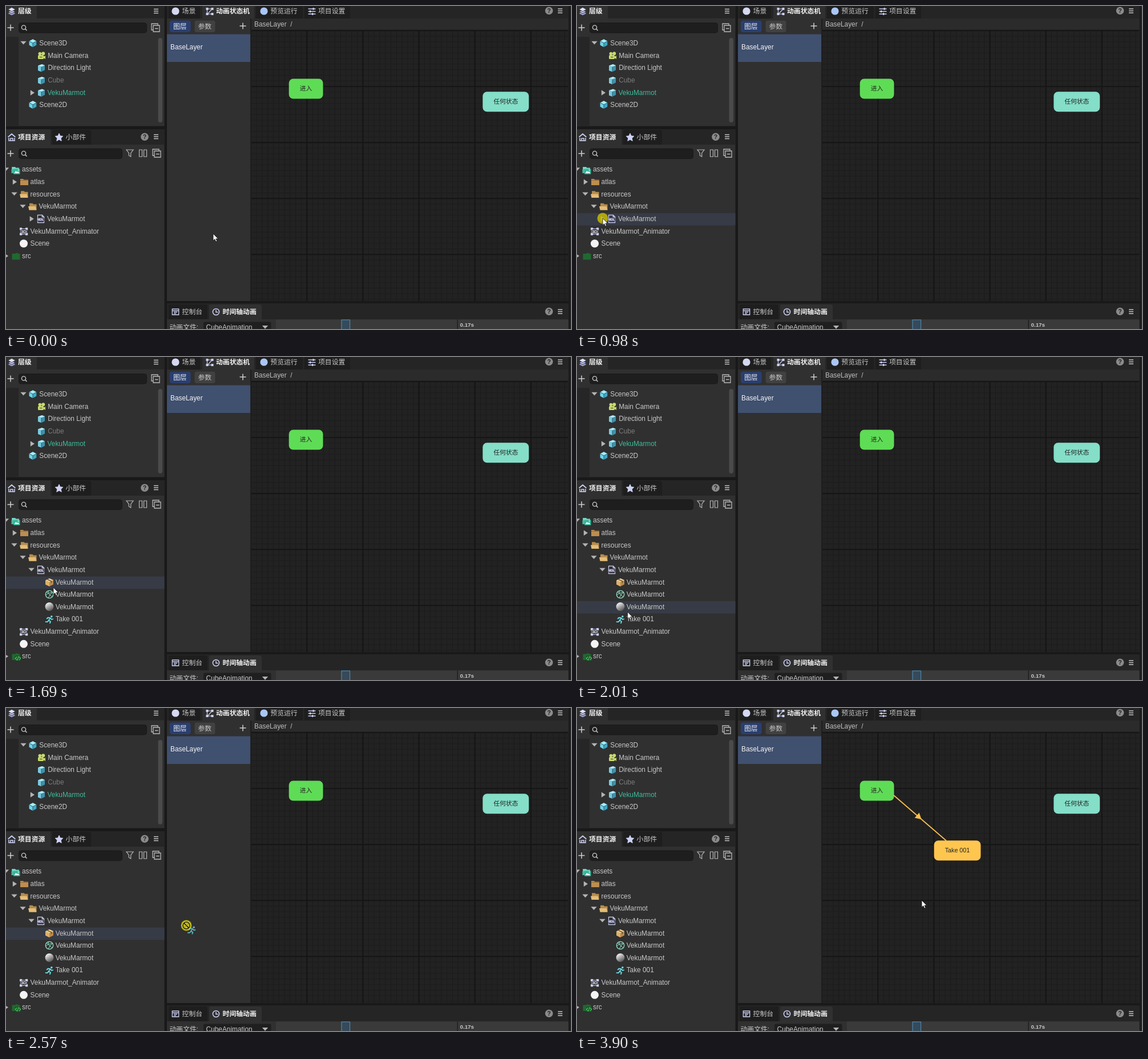
Recreate the animation shown at these times as an HTML page. Size 990 by 566 pixels, loop 4.38 s.

```html
<!DOCTYPE html>
<html lang="zh-CN">
<head>
<meta charset="utf-8">
<title>Editor</title>
<style>
html, body { margin: 0; width: 100%; height: 100%; overflow: hidden; background: #191919; }
svg { display: block; }
text { font-family: "Liberation Sans", Arial, "Noto Sans CJK SC", "Noto Sans CJK", sans-serif; white-space: pre; }
</style>
</head>
<body>
<svg id="stage" width="990" height="566" viewBox="0 0 990 566"></svg>
<script>
const LOOP = 4380, ROW = 21.64, TREE_TOP = 276.4;
const PANEL = '#303030', BAR = '#252525', TAB = '#1e1e1e', INK = '#c8c8c8', LILAC = '#cfd3f6';
const NAME = 'VekuMarmot';

const rect = (x, y, w, h, fill, r = 0, extra = '') =>
  `<rect x="${x}" y="${y}" width="${w}" height="${h}" rx="${r}" fill="${fill}" ${extra}/>`;
const text = (x, y, s, fill = INK, size = 11.85, extra = '') =>
  `<text x="${x}" y="${y}" fill="${fill}" font-size="${size}" ${extra}>${s}</text>`;
const bold = (x, y, s, fill = '#f2f2f2', size = 11.85) => text(x, y, s, fill, size, 'font-weight="700"');
const line = (d, color = INK, w = 1.2, extra = '') =>
  `<path d="${d}" fill="none" stroke="${color}" stroke-width="${w}" ${extra}/>`;
const shape = (d, fill, extra = '') => `<path d="${d}" fill="${fill}" ${extra}/>`;
const dot = (x, y, r, fill, extra = '') => `<circle cx="${x}" cy="${y}" r="${r}" fill="${fill}" ${extra}/>`;
const at = (x, y, s, extra = '') => `<g transform="translate(${x} ${y})" ${extra}>${s}</g>`;

// Small interface icons, each centred on the given point
const menu = (x, y) => at(x, y, line('M-4-3.5H4M-4 0H4M-4 3.5H4', '#c4c4c4', 1.4));
const plus = (x, y) => at(x, y, line('M-5.5 0H5.5M0-5.5V5.5', '#d0d0d0', 1.5));
const help = (x, y) => dot(x, y, 6.8, '#8b8b8b') + text(x, y + 3.8, '?', '#222', 10.5, 'font-weight="700" text-anchor="middle"');
const search = (x, y, w) => rect(x, y, w, 17.5, '#1e1e1e', 4, 'stroke="#191919"') +
  at(x + 9, y + 8.5, '<circle cx="-.5" cy="-.5" r="3.6" fill="none" stroke="#c8c8c8" stroke-width="1.4"/>' + line('M2 2L5 5', INK, 1.6));
const collapse = (x, y) => at(x, y, line('M-4 4H-7V-7H4V-4M-4-4H7V7H-4ZM-1 1.5H4.5', '#b8b8b8', 1.3));
const down = (x, y) => at(x, y, shape('M-5.2-2.8H5.2L0 3Z', '#b4b4b4'));
const right = (x, y) => at(x, y, shape('M-3.2-4.8L4 0L-3.2 4.8Z', '#b4b4b4'));

// Tree icons
const cube = (x, y, side = '#3fa9c8') => at(x, y,
  shape('M0-6.8L6.3-3.4V3.6L0 7L-6.3 3.6V-3.4Z', side) +
  shape('M0-6.8L6.3-3.4L0 0L-6.3-3.4Z', '#a6ecf5') + shape('M-6.3-3.4L0 0V7L-6.3 3.6Z', '#6fd3e6') +
  line('M-6.3-3.4L0 0L6.3-3.4M0 0V7', '#24505f', .9));
const block = (x, y) => at(x, y,
  shape('M-6-4L1-6.6L6-4.6V3.8L0 6.8L-6 4.4Z', '#3f93ac') + shape('M-6-4L1-6.6L6-4.6L0-2Z', '#b4e9f2') +
  shape('M-6-4L0-2V6.8L-6 4.4Z', '#78cadd') + line('M0-2V6.8', '#2b5360', .9));
const camera = (x, y) => at(x, y,
  dot(-2.6, -3.4, 2.8, '#c9da6e') + dot(3.2, -3.8, 3, '#c9da6e') + rect(-6, -1, 10, 7, '#c9da6e', 1.5) +
  shape('M4 1.5L7 0V6L4 4Z', '#c9da6e') + line('M-3 2.5H1.5', '#55602a', 1.3));
const folder = (x, y, c) => at(x, y, shape('M-7-5H-2L-.6-3.4H7V6H-7Z', c) + line('M-7-2.6H7', '#7d5a2c', .7));
const openFolder = (x, y) => at(x, y,
  shape('M-5.5-1V-5.8H0L1.5-4.2H7V5.8H-6Z', '#b58b4c') + shape('M-7.5-.6H5.2L7 6H-6Z', '#e3bd78'));
const assets = (x, y) => at(x, y,
  shape('M-6.8-6H-1L.5-4.4H6V0H-6.8Z', '#72d8c4') + rect(-7.5, -2, 5, 7, '#4eb7a2') + rect(-4, -2.6, 11.5, 9.4, '#35b497', 1) +
  shape('M-2.6 5L.4.8L2.4 3L4 1.6L6.3 5Z', '#e7fff8') + dot(4.6, -.4, 1, '#e7fff8'));
const model = (x, y) => at(x, y,
  line('M-5.5-1V-6.6H2.5L5.6-3.4V6.6H-5.5V4M2.3-6.6V-3.4H5.6', LILAC, 1.2) +
  rect(-6.8, -1.6, 12.8, 6, '#55557a', 1) + text(-.4, 3.3, 'MDL', '#fff', 5.2, 'font-weight="700" text-anchor="middle"'));
const animator = (x, y) => at(x, y,
  [[-7, -6.5], [3, -6.5], [-7, 2.7], [3, 2.7]].map(p => rect(p[0], p[1], 4.2, 4, LILAC)).join('') +
  line('M-3-4.5H3M-3 4.7H3M-5-2V3M5-2V3', LILAC, 1) + rect(-4.6, -3.2, 9.4, 6.6, PANEL) +
  text(0, 2.8, '3D', '#eef', 7.6, 'font-weight="700" text-anchor="middle"'));
const box = (x, y) => at(x, y,
  shape('M-7-3.5L0-7L7-4V3.6L0 7L-7 3.6Z', '#b98a4c') + shape('M-7-3.5L0-7L7-4L0-.6Z', '#f2d49a') +
  shape('M-7-3.5L0-.6V7L-7 3.6Z', '#ddb06a') + line('M-3.5-5.2L3.5-2.2V1', '#73532a', 1.6));
const mesh = (x, y) => at(x, y,
  '<circle r="6.7" fill="none" stroke="#8fe0c2" stroke-width="1.3"/>' +
  line('M-5-4.5L5 4.6M-1.5-6.4L-2.2-1.8L-6.4 1.4M-2.2-1.8L5.4-3.6M1 1L5.4-3.6M1 1L-2 6.3', '#8fe0c2', 1));
const runner = (x, y) => at(x, y,
  dot(3.8, -5.2, 1.8, '#70dfe8') +
  line('M1.6-3L-1.2 1.4L2 3.4L.8 7M-1.2 1.4L-3.4 4.2H-7.2M1.6-3L-2.6-3.4L-4.8-.8M1.6-2.6L3.8-.2L6.8-1', '#70dfe8', 1.8, 'stroke-linejoin="round"'));
const source = (x, y) => at(x, y,
  shape('M-7.5-4.6H-2L0-6L6.5-4V6H-7.5Z', '#20692f') +
  `<g id="code">${rect(-2, -1.5, 10, 9, '#1d4a27', 1)}${line('M1 0L-1.4 3L1 6M5 0L7.4 3L5 6M4-.6L2 6.6', '#4ed667', 1.2)}</g>`);

const label = (x, row, s) => text(x, TREE_TOP + 13.9 + ROW * row, s);
const tab = (x, y, w, h, fill) => shape(`M${x} ${y + h}V${y + 3}q0-3 3-3H${x + w - 3}q3 0 3 3V${y + h}Z`, fill);
const node = (x, y, w, fill, s) => rect(x, y, w, 35, fill, 7.5) +
  text(x + w / 2, y + 20.4, s, '#232323', 10.75, 'text-anchor="middle"');

function grid() {
  const run = (start, step, end, f) => {
    let d = '';
    for (let p = start; p < end; p += step) d += f(p.toFixed(1));
    return d;
  };
  const lines = step => run(429.2 + step, step, 985, x => `M${x} 42V517`) + run(43, step, 517, y => `M430 ${y}H985`);
  return rect(430, 42, 555.5, 475, '#222') + line(lines(9.81), '#1c1c1c', 1) + line(lines(98.1), '#161616', 2.4);
}

function hierarchy() {
  const y = i => 69 + ROW * i;
  return rect(0, 0, 277.5, 210.5, PANEL) + rect(54, 0, 223.5, 21.5, BAR) +
    at(10, 9, shape('M0 1L-6.5 4L0 7.2L6.5 4Z', '#9ba0d0') + shape('M0-2L-6.5 1L0 4.2L6.5 1Z', '#b9bde6', 'stroke="#303030" stroke-width=".8"') +
      shape('M0-6.6L-6.5-3L0 .6L6.5-3Z', '#e0e3ff', 'stroke="#303030" stroke-width=".8"')) +
    bold(21, 13.4, '层级') + menu(263, 9) + plus(8, 38) + search(22.5, 29.5, 224) + collapse(262, 38) +
    rect(0, 54, 22, 156.5, '#262626') + rect(266.5, 56, 7.5, 148, '#4b4b4b', 3.7) +
    down(30.5, 64.5) + cube(47, 65) + text(58.3, y(0), 'Scene3D') +
    camera(62, 87) + text(73.2, y(1), 'Main Camera') +
    block(62, 108.5) + text(73.2, y(2), 'Direction Light') +
    block(62, 130.5) + text(73.2, y(3), 'Cube', '#7c7c7c') +
    right(46, 152) + block(62, 152) + text(72.6, y(4), NAME, '#3dbd9c') +
    cube(47, 173) + text(58.3, y(5), 'Scene2D');
}

function resources() {
  return rect(0, 216, 277.5, 350, PANEL) + rect(78, 216, 199.5, 27, BAR) + tab(81, 217, 68, 26, TAB) +
    at(10, 230, shape('M-7-1L0-7L7-1L5.8.2L0-4.4L-5.8.2Z', LILAC) + line('M-5 1V6H5V1M-2 6V2H2V6', LILAC, 1.5)) +
    bold(21, 234.2, '项目资源') +
    at(93, 230, shape('M0-6.8L2-2.3L6.8-1.8L3.2 1.5L4.2 6.4L0 4L-4.2 6.4L-3.2 1.5L-6.8-1.8L-2-2.3Z', LILAC, `stroke="${LILAC}" stroke-linejoin="round"`)) +
    text(104.6, 234.2, '小部件') + help(243, 229.2) + menu(263, 229) +
    plus(8, 258.5) + search(22.5, 250, 181) +
    at(217, 258, line('M-6-6H6L1.7-.3V6L-1.7 4V-.3Z', '#b8b8b8', 1.2)) +
    at(240, 258, line('M-6.5-6H-1.5V6H-6.5ZM1.5-6H6.5V6H1.5Z', '#b8b8b8', 1.2)) + collapse(264, 258) +
    rect(0, 0, 277.5, ROW, '#373b46', 0, 'id="hover"') +
    down(0, 286) + assets(17, 288) + label(28, 0, 'assets') +
    right(15, 308.3) + folder(32, 308, '#bd8d50') + label(42.6, 1, 'atlas') +
    down(14.5, 329.3) + openFolder(31.5, 330) + label(42.6, 2, 'resources') +
    down(29.5, 351) + openFolder(46.5, 351.6) + label(57.4, 3, NAME) +
    `<g id="shut">${right(44.8, 373)}</g>` + model(61, 373) + label(72, 4, NAME) +
    `<g id="kids">${down(44.5, 372.6)}${box(76, 395)}${mesh(76, 416)}${dot(76, 437.5, 7.4, 'url(#ball)')}${runner(76, 460)}` +
    [NAME, NAME, NAME, 'Take 001'].map((s, i) => label(86.7, 5 + i, s)).join('') + '</g>' +
    `<g id="tail">${animator(31, 395)}${label(42.6, 5, NAME + '_Animator')}${dot(31, 416.3, 7, '#f4f4f4')}${label(42.6, 6, 'Scene')}` +
    `${right(0, 438)}${source(18, 438.5)}${label(28, 7, 'src')}</g>`;
}

function machine() {
  return rect(282, 0, 703.5, 517, PANEL) + rect(282, 0, 703.5, 22, BAR) +
    rect(285, 0, 55, 22, TAB) + rect(344, 0, 91, 22, PANEL) + rect(438, 0, 82, 22, TAB) + rect(523, 0, 80, 22, TAB) +
    dot(297, 9, 6.6, '#d5d8f2') + text(308.6, 13.4, '场景') +
    at(357, 9.5, line('M-4.5-4.5H4.5M4.5-4.5L-4 4.5H5M-4.5-4V4', LILAC, 1.1) +
      [[-6.5, -6.5], [2.5, -6.5], [-6.5, 2.5], [2.5, 2.5]].map(p => rect(p[0], p[1], 4, 4, LILAC)).join('')) +
    bold(368, 13.4, '动画状态机') + dot(452, 9, 6.6, '#a9c6f5') + text(463.3, 13.4, '预览运行') +
    at(536, 9.5, line('M-6.5-4.5H6.5M-6.5 0H6.5M-6.5 4.5H6.5', LILAC, 1.3) +
      rect(1.5, -6.3, 2.2, 3.6, LILAC) + rect(-4, -1.8, 2.2, 3.6, LILAC) + rect(0, 2.7, 2.2, 3.6, LILAC)) +
    text(547, 13.4, '项目设置') + help(951.5, 8.2) + menu(971, 8.5) +
    rect(287, 25.5, 36.5, 20.5, '#2a3f70', 4) + text(293, 40, '图层', '#f0f0f0') +
    rect(330.5, 25.5, 36, 20.5, '#414141', 4) + text(336.5, 40, '参数') + plus(415, 35) +
    rect(282, 49.5, 146.5, 48.5, '#40506f') + text(288, 76, 'BaseLayer', '#f4f4f4') +
    rect(428.3, 22, 2, 495, '#1b1b1b') + rect(430, 22, 555.5, 20, '#2b2b2b') +
    text(435, 36.2, 'BaseLayer  /', '#bdbdbd') + grid() +
    node(495.7, 127.5, 59.8, '#5fdc56', '进入') + node(835.3, 150.3, 80.8, '#84dec8', '任何状态') +
    `<g id="take">${line('M555 153L647 232.5', '#fbbf4d', 1.7)}` +
    at(599, 191, shape('M6 0L-4.5-6V6Z', '#fbbf4d', 'transform="rotate(41)"')) +
    node(625.6, 232.3, 81.8, '#ffc64f', 'Take 001') + '</g>';
}

function timeline() {
  return rect(282, 521.5, 703.5, 45, PANEL) + rect(282, 521.5, 703.5, 27.5, BAR) +
    tab(285, 523, 68, 26, TAB) + tab(356, 523, 92, 26, PANEL) +
    at(297, 536, line('M-5.7-5H5.7V5H-5.7ZM-5.7-2H5.7M-3 .5H3M-3 2.8H1', LILAC, 1.3)) + text(308.6, 540.3, '控制台') +
    at(368, 536, '<circle r="5.6" fill="none" stroke="#cfd3f6" stroke-width="1.5"/>' + line('M0-3.5V.5H3.5', LILAC, 1.4)) +
    bold(379.6, 540.3, '时间轴动画') + help(951.5, 535.3) + menu(971, 535.5) +
    text(286.5, 567, '动画文件:') + rect(346, 553.5, 118.5, 18, '#1f1f1f', 3) +
    text(350.6, 567, 'CubeAnimation') + down(454, 562.8) +
    rect(473, 549.5, 512.5, 17, '#3a3a3a') + rect(588, 550, 14.5, 20, '#354a5a', 0, 'stroke="#4c86ad" stroke-width="1.2"') +
    rect(790.5, 549.5, 1.4, 17, '#1d1d1d') + bold(795.5, 561.6, '0.17s', '#c8c8c8', 9.8);
}

const pointer = `<g id="pointer">
  <circle id="press" r="9.5" fill="#cac200" opacity=".8"/>
  <g id="ghost" opacity=".75">${runner(9.3, 8.5)}</g>
  <g id="deny">${line('M-4.2-4.2L4.2 4.2', '#f2e93c', 3.6)}<circle r="6" fill="none" stroke="#f2e93c" stroke-width="3.6"/>
    ${line('M-4.2-4.2L4.2 4.2', '#26260a', 1.8)}<circle r="6" fill="none" stroke="#26260a" stroke-width="1.8"/></g>
  <g id="copy">${line('M1.5 10.5V18.5H7', '#ddd', 1, 'stroke-dasharray="1.5 1"')}${rect(7, 15, 8.5, 8.5, '#fff', 0, 'stroke="#111" stroke-width=".8"')}${line('M8.8 19.2H13.7M11.2 16.8V21.7', '#111', 1.3)}</g>
  <path id="arrow" d="M0 0V12.2L2.8 9.6L4.8 14L6.8 13.1L4.9 8.9H8.8Z" fill="#fff" stroke="#111" stroke-width=".8"/></g>`;

document.getElementById('stage').innerHTML =
  `<defs><linearGradient id="ball" x1=".2" y1="0" x2=".8" y2="1"><stop offset=".1" stop-color="#eee"/><stop offset=".55" stop-color="#9a9a9a"/><stop offset="1" stop-color="#4a4a4a"/></linearGradient></defs>` +
  rect(0, 0, 990, 566, '#191919') + rect(988.5, 0, 2, 566, '#2a2a2a') +
  hierarchy() + resources() + machine() + timeline() + pointer;

// Pointer travel: begin, end, steps, then start, control and end points
const moves = [
  [70, 520, 7, 363, 399, 235, 414, 47, 373],
  [600, 601, 1, 47, 373, 46, 372, 45, 372],
  [1290, 1770, 7, 45, 372, 83, 388, 84, 410],
  [1860, 2180, 5, 84, 410, 87.4, 449.4, 92, 459.5],
  [2330, 2810, 7, 92, 459.5, 240.7, 436, 555, 254.5],
  [2880, 3130, 4, 555, 254.5, 605, 239, 627, 233.5],
  [3590, 3900, 5, 627, 233.5, 622, 285, 604, 337]
];

function locate(t) {
  const [a, b, n, x0, y0, cx, cy, x1, y1] = moves.filter(m => t >= m[0]).pop() || moves[0];
  const gap = n > 1 ? (b - a) / (n - 1) : 1;
  const step = t < a ? 0 : Math.min(n, Math.floor((t - a) / gap + .15) + 1);
  const u = step / n, v = 1 - u;
  return [v * v * x0 + 2 * u * v * cx + u * u * x1, v * v * y0 + 2 * u * v * cy + u * u * y1];
}

const el = id => document.getElementById(id);
const show = (id, on) => el(id).setAttribute('display', on ? 'inline' : 'none');
const move = (id, x, y) => el(id).setAttribute('transform', `translate(${x} ${y})`);

function draw(t) {
  const [x, y] = locate(t);
  const open = t >= 1060, held = t >= 2330 && t < 3370, drag = held && t >= 2400;
  const overGrid = x > 430;
  const row = x < 277 ? Math.floor((y - TREE_TOP) / ROW) : 5;

  show('kids', open);
  show('shut', !open);
  show('code', open);
  move('tail', 0, open ? ROW * 4 : 0);
  show('hover', x < 277 || (drag && !overGrid));
  move('hover', 0, TREE_TOP + ROW * row);
  show('take', t >= 3370);

  move('pointer', x, y);
  show('press', held || (t >= 980 && t < 1060));
  show('ghost', drag);
  show('deny', drag && !overGrid);
  show('copy', drag && overGrid);
  show('arrow', !drag || overGrid);
}

function tick() {
  draw(performance.now() % LOOP);
  requestAnimationFrame(tick);
}
tick();
</script>
</body>
</html>
```
